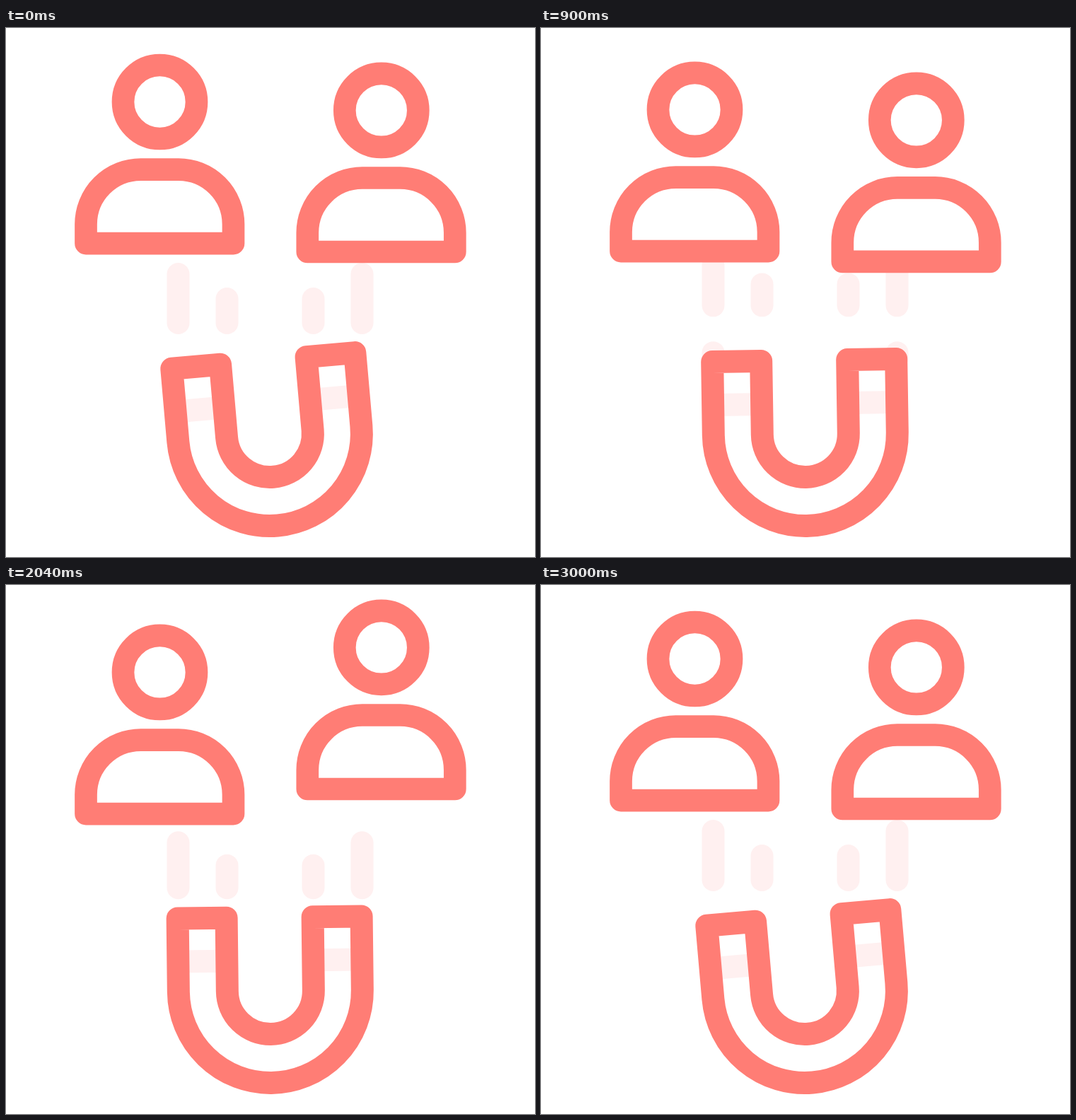
An HTML page with a canvas for the animation above (3.03 s loop, 748 by 748 pixels).

```html
<!DOCTYPE html>
<html>
<head>
<meta charset="utf-8">
<title>Magnet</title>
<style>
  html, body { margin: 0; width: 100%; height: 100%; overflow: hidden; background: #fff; }
  canvas { display: block; }
</style>
</head>
<body>
<canvas id="stage" width="748" height="748"></canvas>
<script>
const ctx = document.getElementById('stage').getContext('2d');
const LOOP = 3030, SPAN = 3000, STEP = 30;
const CORAL = '#ff7d75', BLUSH = '#fff0f0';
const PERIOD = 145, MIDDLE = 424;

const body = new Path2D('M113 268.3V241.3a77.5 77.5 0 0 1 77.5-77.5H244a77.5 77.5 0 0 1 77.5 77.5V268.3Z');
const head = new Path2D();
head.arc(217.5, 68.2, 52, 0, Math.PI * 2);
const magnet = new Path2D('M244 470H313V574a61 61 0 0 0 122 0V470H504V574a130 130 0 0 1-260 0Z');
const bands = new Path2D('M244 531H313M435 531H504');

// Bobbing: a few harmonics of the loop, each as [cosine, sine] amplitudes
const bob = (mean, ...waves) => t => waves.reduce((y, [c, s], i) => {
  const a = 2 * Math.PI * (i + 1) * t / SPAN;
  return y + c * Math.cos(a) + s * Math.sin(a);
}, mean);

const leftY = bob(42.7, [9.6, -2], [-16, 6]);
const rightY = bob(42.3, [3.1, 7.8], [.5, -20.3], [2.3, 0]);

// The magnet swings around the loop seam and comes to rest in between
function tilt(t) {
  const d = t > SPAN / 2 ? t - SPAN : t;
  return -.6 - 4.73 * Math.exp(-((d / 600) ** 2)) * Math.cos(.0055 * d + .375);
}

const stretch = t => 1 - .145 * Math.sin(Math.PI * Math.min(t / 2610, 1)) ** 1.5;

function stroke(color, ...paths) {
  ctx.strokeStyle = color;
  paths.forEach(p => ctx.stroke(p));
}

function person(x, y) {
  ctx.save();
  ctx.translate(x, y);
  stroke(CORAL, head, body);
  ctx.restore();
}

// Dashes run down towards the magnet, six periods per loop
function pull(x, dash, t) {
  const s = stretch(t), run = 94 - dash + 6 * PERIOD * t / SPAN;
  const line = new Path2D();
  line.moveTo(x, MIDDLE - 101 * s);
  line.lineTo(x, MIDDLE + 48 * s);
  ctx.setLineDash([dash * s, (PERIOD - dash) * s]);
  ctx.lineDashOffset = -run * s;
  stroke(BLUSH, line);
}

function draw(now) {
  const t = Math.floor(now % LOOP / STEP) * STEP;
  ctx.fillStyle = '#fff';
  ctx.fillRect(0, 0, 748, 748);
  ctx.lineJoin = 'round';
  ctx.lineWidth = 32;

  ctx.save();
  ctx.lineCap = 'round';
  for (const side of [-1, 1]) {
    pull(373.5 + side * 130, 69, t);
    pull(373.5 + side * 61, 34, t);
  }
  ctx.restore();

  ctx.save();
  ctx.translate(374, 587);
  ctx.rotate(tilt(t) * Math.PI / 180);
  ctx.translate(-374, -587);
  stroke(BLUSH, bands);
  stroke(CORAL, magnet);
  ctx.restore();

  ctx.lineWidth = 31.7;
  person(0, leftY(t));
  person(313.3, rightY(t));
}

let start;
function tick(now) {
  start ??= now;
  draw(now - start);
  requestAnimationFrame(tick);
}
draw(0);
requestAnimationFrame(tick);
</script>
</body>
</html>
```
